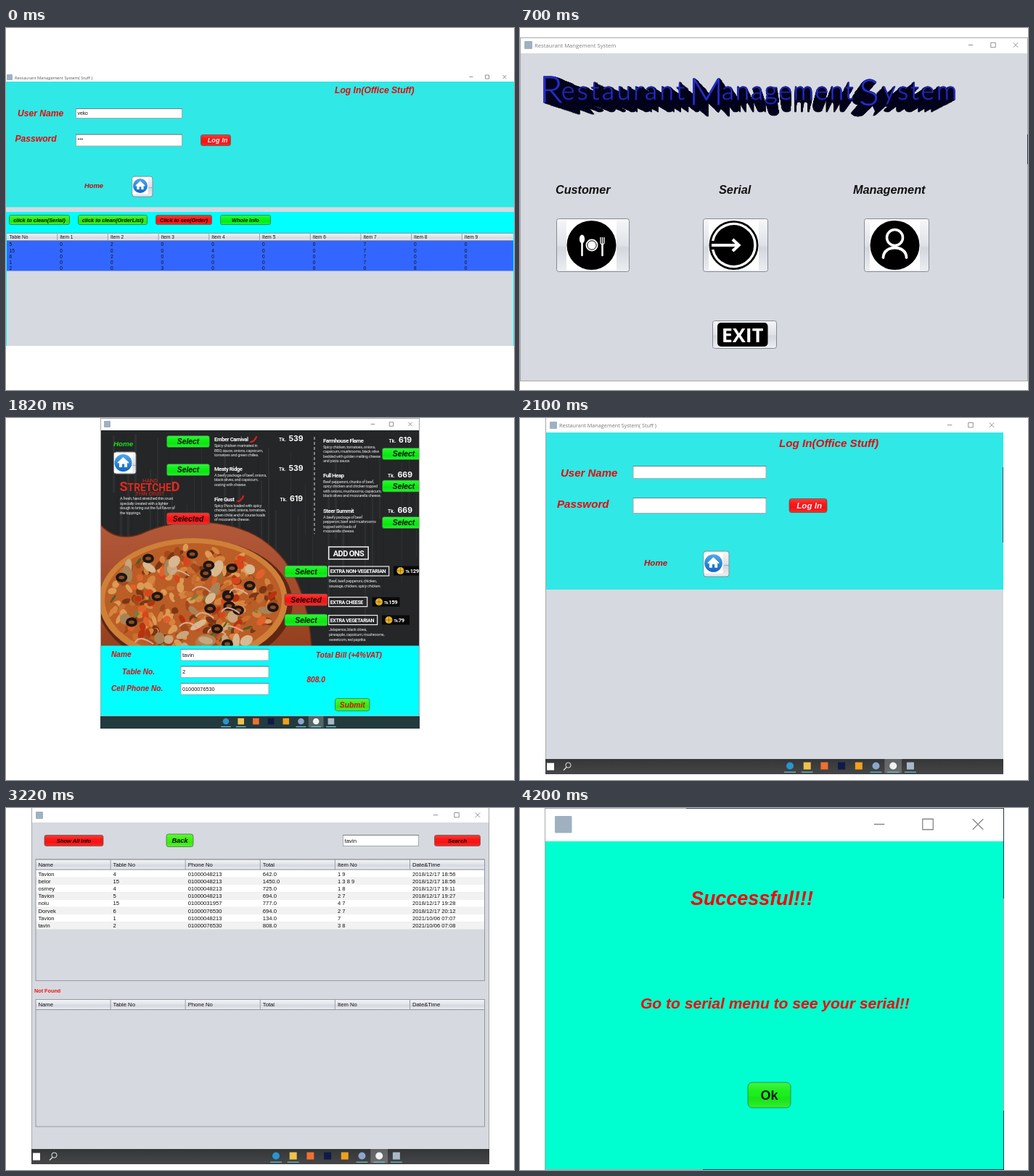
These frames come from a looping animation (700x500 px, 4.9 s). An HTML page:

```html
<!DOCTYPE html>
<html lang="en">
<head>
<meta charset="utf-8">
<title>Restaurant Management System</title>
<style>
  html, body { margin: 0; width: 100%; height: 100%; overflow: hidden; background: #fff; }
  svg { display: block; width: 100vw; height: 100vh; }
  text { font-family: "Liberation Sans", Arial, sans-serif; white-space: pre; }
  .bi { font-weight: 700; font-style: italic; }
  .b { font-weight: 700; }
  .it { font-style: italic; }
  .ui { font-family: "Open Sans", sans-serif; }
  .ro { font-family: Roboto, sans-serif; }
  .rb { font-family: Roboto, sans-serif; font-weight: 700; }
  .tight { letter-spacing: -.055em; }
  .num { font-family: Inter, sans-serif; font-weight: 700; }
  .serif { font-family: "Noto Serif", serif; font-weight: 700; }
  .lato { font-family: Lato, sans-serif; font-weight: 300; }
  .slide { visibility: hidden; animation: show 4900ms step-end infinite; }
  @keyframes show {
    0% { visibility: visible; }
    14.2857%, 100% { visibility: hidden; }
  }
</style>
</head>
<body>
<svg id="stage" viewBox="0 0 700 500"></svg>
<script>
const GREY = '#d6d9df', RED = '#ff1414', GREEN = '#2cf012', INK = '#e80808';
const CYAN = '#00ffff', TEAL = '#30e8e6';
const PHONE = ['01000048213', '01000076530', '01000031957'];

const rect = (x, y, w, h, fill, more = '') =>
  `<rect x="${x}" y="${y}" width="${w}" height="${h}" fill="${fill}" ${more}/>`;
const circle = (x, y, r, fill, more = '') =>
  `<circle cx="${x}" cy="${y}" r="${r}" fill="${fill}" ${more}/>`;
const ellipse = (x, y, rx, ry, fill, more = '') =>
  `<ellipse cx="${x}" cy="${y}" rx="${rx}" ry="${ry}" fill="${fill}" ${more}/>`;
const path = (d, stroke, width, fill = 'none', more = '') =>
  `<path d="${d}" stroke="${stroke}" stroke-width="${width}" fill="${fill}" ${more}/>`;
const text = (x, y, s, size, cls = '', fill = '#111', more = '') =>
  `<text x="${x}" y="${y}" font-size="${size}" class="${cls}" fill="${fill}" ${more}>${s}</text>`;
const lines = (x, y, s, step = 6.65) =>
  s.split('|').map((l, i) => text(x, y + i * step, l, 5.7, 'ro tight', '#e6e6e6')).join('');

const frame = (x, y, w, h) =>
  rect(x + .5, y + .5, w - 1, h - 1, 'none', 'stroke="#a8a8a8"');

function button(x, y, w, h, fill, label, size, color = '#0a0a0a', cls = 'bi') {
  return rect(x + .5, y + .5, w - 1, h - 1, fill, `rx="${h / 6}" stroke="#47604a" stroke-opacity=".7"`) +
    rect(x + 1, y + 1, w - 2, h - 2, 'url(#gloss)', `rx="${h / 7}"`) +
    text(x + w / 2, y + h / 2 + size * .34, label, size, cls, color, 'text-anchor="middle"');
}

const plainButton = (x, y, w, h) =>
  rect(x + .5, y + .5, w - 1, h - 1, 'url(#steel)', 'rx="3" stroke="#868b94"');

const field = (x, y, w, h, s = '', size = 7.6) =>
  rect(x + .5, y + .5, w - 1, h - 1, '#fff', 'stroke="#a4a9b0"') +
  path(`M${x} ${y + .5}h${w}`, '#777d86', 1) +
  text(x + 2.5, y + h / 2 + size * .36, s, size);

function controls(xs, y, s, color = '#777') {
  const [a, b, c] = xs, h = s / 2;
  return path(`M${a - h} ${y}h${s}M${b - h} ${y - h}h${s}v${s}h${-s}z` +
    `M${c - h} ${y - h}l${s} ${s}m0 ${-s}l${-s} ${s}`, color, Math.max(.8, s / 11));
}

const appIcon = (x, y, s) => rect(x, y, s, s, '#9fb1c1', 'rx="1"');

function home(x, y, s, cx, cy, r) {
  const k = r / 12;
  return plainButton(x, y, s, s) +
    rect(cx - r * 1.06, cy - r * 1.15, r * 2.12, r * 2.3, '#fff') +
    circle(cx, cy, r, 'url(#blue)') +
    `<path transform="translate(${cx} ${cy}) scale(${k})" fill="#fff"
      d="M0 -8L8 -.5L6.8 .8L5.5 -.3V6H1.7V1.5H-1.7V6H-5.5V-.3L-6.8 .8L-8 -.5z"/>` +
    text(x + s - 1, cy + r * .3, '...', r * .6, '', '#333', 'text-anchor="end"');
}

function header(x, y, w, h, names, step, size) {
  return rect(x, y, w, h, 'url(#steel)') +
    path(`M${x} ${y + .5}h${w}M${x} ${y + h - .5}h${w}`, '#8f949d', 1) +
    names.map((n, i) => text(x + step * i + 3.5, y + h / 2 + size * .36, n, size) +
      (i ? path(`M${x + step * i} ${y}v${h}`, '#9ca1aa', 1) : '')).join('');
}

const cells = (x, y, rows, step, pitch, size, cls = '') =>
  rows.map((row, j) => row.map((s, i) =>
    text(x + step * i, y + pitch * j, s, size, cls)).join('')).join('');

function taskIcons(x, step, y, s) {
  const fills = ['#2b94cf', '#efc34a', '#f07030', '#101a48', '#f0a01e', '#8ea5cc', '#f2f2f2', '#a9b8c6'];
  const h = s / 2;
  return fills.map((f, i) => {
    const cx = x + step * i, open = [0, 1, 5, 6, 7].includes(i);
    return (i === 6 ? rect(cx - step / 2, y - s, step, s * 2, '#fff', 'opacity=".22"') : '') +
      ([0, 5, 6].includes(i) ? circle(cx, y, h, f) : rect(cx - h, y - h, s, s, f)) +
      (open ? rect(cx - s * .8, y + s * .8, s * 1.6, 1.2, '#6fc3cc') : '');
  }).join('');
}

const desktopBar = () => rect(35, 471, 631, 21, 'url(#bar)') +
  rect(37, 476.5, 10, 10, '#fff') +
  circle(66.5, 479.5, 3.6, 'none', 'stroke="#eee"') + path('M64 482.5l-4 4', '#eee', 1.1) +
  taskIcons(372, 23.7, 480.5, 10);

function orders() {
  const items = ['5 0 2 0 0 0 0 7 0 0', '15 0 0 0 4 0 0 7 0 0', '6 0 2 0 0 0 0 7 0 0',
    '1 0 0 0 0 0 0 7 0 0', '2 0 0 3 0 0 0 0 8 0'].map(r => r.split(' '));
  const names = ['Table No', ...Array.from({ length: 9 }, (_, i) => 'Item ' + (i + 1))];
  return appIcon(1, 64, 8) + text(12, 70.5, 'Restaurant Management System( Stuff )', 5.8, 'ui', '#555') +
    controls([641, 663, 687], 67.5, 5) +
    rect(0, 74, 700, 174, TEAL) + rect(0, 247.5, 700, 6.5, GREY) + rect(0, 254, 700, 185, CYAN) +
    text(453, 90, 'Log In(Office Stuff)', 12.15, 'bi', INK) +
    text(16, 122, 'User Name', 12.1, 'bi', INK) + text(12.5, 157, 'Password', 12.1, 'bi', INK) +
    field(96, 111, 147, 14, 'veko', 6.8) + field(96, 146.5, 147, 17, '***', 6.8) +
    button(268, 147, 42, 16, RED, '  Log In', 9.3, '#d8f2f8') +
    text(108, 221, 'Home', 9.4, 'bi', '#c80808') + home(173.5, 204.5, 29, 185, 218, 10) +
    button(4, 258, 84, 14, GREEN, 'click to clean(Serial)', 7.4) +
    button(99, 258, 96, 14, GREEN, 'click to clean(OrderList)', 7.4) +
    button(206, 258, 78, 14, RED, 'Click to see(Order)', 7.4) +
    button(295, 258, 70, 14, '#04f71a', 'Whole Info', 7.4) +
    rect(1, 283, 698, 156, GREY) +
    header(1, 283, 698, 11, names, 69.7, 6.6) + rect(1, 294, 698, 41.5, '#3366ff') +
    cells(4.5, 301.3, items, 69.7, 8.2, 6.6);
}

// Headline with the slices of its depth shrinking towards one point
function headline() {
  const big = (x, y, s) => `<text x="${x}" y="${y}" font-size="52" class="lato">${s}</text>`;
  const small = (x, s, gap) =>
    `<text x="${x}" y="99" font-size="35" class="lato" letter-spacing="${gap}">${s}</text>`;
  let s = '<defs><g id="title" stroke-width=".8">' + big(27, 103, 'R') + small(57, 'estaurant', 3.6) +
    big(233, 106, 'M') + small(278, 'anagement', 1.9) + big(467, 107, 'S') + small(500, 'ystem', 2.9) + '</g></defs>';
  for (let i = 45; i > 0; i--) {
    const d = i * .0031;
    s += `<use href="#title" fill="#04041c" stroke="#04041c" transform="translate(${375 * d} ${218 * d}) scale(${1 - d})"/>`;
  }
  return s + '<use href="#title" fill="#2832d8" stroke="#1c22a8"/>';
}

function mainMenu() {
  const tile = (x, w, cx) => plainButton(x, 263, w, 74) + rect(cx - 34.5, 265, 69, 69.5, '#fff') +
    circle(cx, 300, 34, '#000');
  return rect(0, 35, 700, 453, GREY) + appIcon(6, 18, 11) +
    text(20, 26.7, 'Restaurant Mangement System', 7.7, 'ui', '#808080') + controls([621, 652, 683], 23.5, 6.5) +
    headline() +
    text(49, 229, 'Customer', 16.2, 'bi') + text(274, 229, 'Serial', 16.3, 'bi') +
    text(459, 229, 'Management', 16.3, 'bi') +
    tile(50, 101, 98.5) + tile(252, 90, 294.5) + tile(474, 90, 516.5) +
    ellipse(85.5, 291.5, 3.6, 6, '#fff') +
    path('M85.5 296V314', '#fff', 2.6, 'none', 'stroke-linecap="round"') +
    circle(99, 300, 8.5, '#fff') + circle(99, 300, 6.2, 'none', 'stroke="#000"') +
    path('M113.5 300V314', '#fff', 2.6, 'none', 'stroke-linecap="round"') +
    path('M111 289v8q2.5 5 5 0v-8M113.5 289v10', '#fff', 1.3) +
    path('M265.6 294A29.5 29.5 0 1 1 265.6 306', '#fff', 3.5) +
    path('M264 300H301M293 292l8.5 8l-8.5 8', '#fff', 4.2) +
    circle(516.5, 289.5, 11, 'none', 'stroke="#fff" stroke-width="3.5"') +
    path('M500.5 317C501 299 532 299 532.5 317', '#fff', 3.8, 'none', 'stroke-linecap="round"') +
    plainButton(265, 404, 89, 39) + rect(272, 407, 69.5, 33, '#000', 'rx="5"') +
    text(306.5, 433.5, 'EXIT', 27, 'ui b', '#fff', 'text-anchor="middle"') +
    frame(0, 13, 700, 475) + rect(699, 147, 1, 41, '#24344f');
}

function pizza() {
  let seed = 11;
  const rnd = () => (seed = seed * 16807 % 2147483647) / 2147483647;
  const cx = 258, cy = 252;
  let s = path('M130 147Q152 172 186 160C240 134 320 140 360 173Q414 214 421 316H130z', '#6b2d18', 1.5, 'url(#wood)') +
    ellipse(cx + 3, cy + 4, 134, 89, '#5f2612') +
    ellipse(cx, cy, 130, 86, '#cf8038') +
    ellipse(cx, cy - 1, 122, 78, '#bb5d26');
  const spot = () => {
    const a = rnd() * 6.283, r = Math.sqrt(rnd());
    return [cx + Math.cos(a) * r * 117, cy + Math.sin(a) * r * 74, rnd()];
  };
  const blob = (n, fills, w, h) => {
    for (let i = 0; i < n; i++) {
      const [x, y, k] = spot();
      s += ellipse(0, 0, w * (.6 + k * .6), h * (.6 + rnd() * .6), fills[i % fills.length],
        `transform="translate(${x} ${y}) rotate(${k * 360})"`);
    }
  };
  blob(260, ['#a34a1c', '#d5843e', '#b95c26', '#dc9a55', '#7c3514', '#c86f30'], 7, 4.5);
  blob(44, ['#d8451c', '#e0612a', '#b8320f'], 7, 4.5);
  blob(22, ['#4c5f22', '#71803a'], 6, 1.7);
  blob(24, ['#c9a57c', '#a98358', '#d8b890'], 11, 7);
  for (let i = 0; i < 26; i++) {
    const [x, y, k] = spot();
    if (i % 3) s += ellipse(x, y, 6, 4.5, '#8c4a22', 'stroke="#1c1613" stroke-width="4"');
    else s += path(`M${x - 12} ${y}q${12 * k} -12 25 2`, '#d6aa96', 2);
  }
  return s;
}

function board() {
  let s = rect(130, 17, 440, 298, '#252627');
  for (let i = 0; i < 60; i++) {
    const x = 131 + (i * 97) % 439;
    s += rect(x, 17 + (i * 53) % 130, 1 + i % 3, 70 + (i * 31) % 130, i % 2 ? '#fff' : '#000', 'opacity=".045"');
  }
  return s;
}

function order() {
  const dish = (x, y, name, body, px, price) => text(x, y, name, 7.7, 'rb tight', '#fff') +
    lines(x, y + 8, body) + text(px, y, 'Tk.', 6.3, 'num', '#fff') + text(px + 13.5, y, price, 10.5, 'num', '#fff');
  const chilli = (x, y) => path(`M${x} ${y}q5 0 8 -7`, '#d52318', 2.2, 'none', 'stroke-linecap="round"');
  const select = (x, y, on) => button(x, y, 60, 17, on ? RED : '#0cf014', on ? 'Selected' : 'Select', 10.3);
  const label = (y, w, s) => rect(444.7, y, w, 13, 'none', 'stroke="#eee" stroke-width="1.2"') +
    text(446.7, y + 9.2, s, 7.1, 'rb tight', '#fff');
  const tag = (x, y, price) => rect(x, y, 38, 13, '#090909') + circle(x + 9.5, y + 6.5, 5, '#e5b52b') +
    path(`M${x + 9.5} ${y + 2}v9M${x + 5} ${y + 6.5}h9`, '#8c6511', .7) +
    text(x + 16.5, y + 9.2, `Tk.<tspan font-size="7.6">${price}</tspan>`, 4.8, 'rb tight', '#fff');
  const label2 = (x, y, s) => text(x, y, s, 10.1, 'bi', '#e00c0c');
  const mid = 'text-anchor="middle"', crust = '#e02a1c';

  return `<g clip-path="url(#menu)">` + board() + pizza() +
    text(148, 39, 'Home', 9.8, 'bi', '#10e818') + home(148.5, 46.5, 31, 161.5, 62, 12) +
    text(198.5, 88.5, 'HAND', 7.6, 'ro', crust, mid) +
    text(198, 100.5, '<tspan font-size="18">S</tspan>TRETCHE<tspan font-size="18">D</tspan>', 13.8, 'rb', crust, mid) +
    text(198.5, 106.5, 'THIN CRUST', 7, 'ro', crust, mid) +
    lines(157, 113, 'A fresh, hand stretched thin crust|specially created with a lighter|dough to bring out the full flavor of|the toppings.') +
    dish(287, 32, 'Ember Carnival', 'Spicy chicken marinated in|BBQ sauce, onions, capsicum,|tomatoes and green chilies.', 376, '539') +
    dish(287, 72.5, 'Meaty Ridge', 'A beefy package of beef, onions,|black olives, and capsicum,|oozing with cheese.', 376, '539') +
    dish(287, 114.5, 'Fire Gust', 'Spicy Pizza loaded with spicy|chicken, beef, onions, tomatoes,|green chilis and of course loads|of mozzarella cheese.', 377.5, '619') +
    chilli(337, 33) + chilli(319, 115) +
    path('M425 26V160', '#ddd', 1, 'none', 'stroke-dasharray="4 3"') +
    dish(437, 33.5, 'Farmhouse Flame', 'Spicy chicken, tomatoes, onions,|capsicum, mushrooms, black olive|bedded with golden melting cheese|and pizza sauce.', 527.5, '619') +
    dish(437, 81.5, 'Full Heap', 'Beef pepperoni, chunks of beef,|spicy chicken and chicken topped|with onions, mushrooms, capsicum,|black olives and mozzarella cheese.', 526, '669') +
    dish(437, 130.5, 'Steer Summit', 'A beefy package of beef|pepperoni, beef and mushrooms|topped with loads of|mozzarella cheese.', 526, '669') +
    rect(444.7, 178, 54.5, 17, 'none', 'stroke="#eee" stroke-width="1.5"') +
    text(472, 190.6, 'ADD ONS', 11, 'rb tight', '#fff', mid) +
    label(205, 83, 'EXTRA NON-VEGETARIAN') + label(247.5, 53, 'EXTRA CHEESE') + label(272.5, 67, 'EXTRA VEGETARIAN') +
    tag(534, 204.5, '129') + tag(504.5, 247.5, '159') + tag(518, 272.5, '79') +
    lines(445, 227, 'Beef, beef pepperoni, chicken,|sausage, chicken, spicy chicken.', 7) +
    lines(445, 294, 'Jalapenos, black olives,|pineapple, capsicum, mushrooms,|sweetcorn, red paprika', 7.2) +
    select(221, 24) + select(221, 63) + select(221, 130.5, 1) + select(518, 41) + select(518, 85.5) +
    select(518, 136) + select(383.5, 203.5) + select(383.5, 242.5, 1) + select(383.5, 270.5) +
    rect(130, 314.5, 440, 97, CYAN) +
    label2(145, 330, 'Name') + label2(160, 353.5, 'Table No.') + label2(145, 377, 'Cell Phone No.') +
    field(240.5, 319, 122, 16.5, 'tavin') + field(240.5, 342.5, 122, 16.5, '2') + field(240.5, 366, 122, 16.5, PHONE[1], 7.3) +
    label2(427, 331, 'Total Bill (+4%VAT)') + label2(414.5, 365, '808.0') +
    button(453, 387, 48.5, 18, '#36f216', 'Submit', 10.3, '#e00c0c') + '</g>' +
    rect(130, 411, 440, 18, '#233b3e') + taskIcons(303, 20.7, 419, 8.6) +
    frame(130, 0, 440, 412) + appIcon(135, 4, 9) + controls([505.5, 531, 557], 8.5, 5.5);
}

function login() {
  return rect(35, 20, 631, 217, TEAL) + rect(35, 237, 631, 234, GREY) +
    appIcon(41, 5, 10) + text(54, 13, 'Restaurant Management System( Stuff )', 7.25, 'ui', '#777') +
    controls([592, 621, 650], 9.7, 6.5) +
    text(357, 40, 'Log In(Office Stuff)', 15.2, 'bi', INK) +
    text(56, 80.5, 'User Name', 15, 'bi', INK) + text(51, 124, 'Password', 15.15, 'bi', INK) +
    field(155.5, 66, 184, 18) + field(155.5, 110, 184, 22) +
    button(370.5, 111, 53, 20, RED, ' Log In', 11.6, '#d8f2f8') +
    text(171, 204, 'Home', 11.6, 'bi', '#d00808') + home(252.5, 183.5, 36, 266.5, 200.5, 12.3) +
    rect(665, 68, 1, 104, '#285a70') + path('M35.5 0V471', '#a8a8a8', 1) + desktopBar();
}

function records() {
  const names = ['Name', 'Table No', 'Phone No', 'Total', 'Item No', 'Date&amp;Time'];
  const [a, b, c] = PHONE;
  const rows = [
    ['Tavion', 4, a, '642.0', '1 9', '2018/12/17 18:56'],
    ['belor', 15, a, '1450.0', '1 3 8 9', '2018/12/17 18:56'],
    ['osmey', 4, a, '725.0', '1 8', '2018/12/17 19:11'],
    ['Tavion', 5, a, '694.0', '2 7', '2018/12/17 19:27'],
    ['nolu', 15, c, '777.0', '4 7', '2018/12/17 19:28'],
    ['Dorvek', 6, b, '694.0', '2 7', '2018/12/17 20:12'],
    ['Tavion', 1, a, '134.0', '7', '2021/10/06 07:07'],
    ['tavin', 2, b, '808.0', '3 8', '2021/10/06 07:08']
  ];
  const grid = (y, h, head) => header(41, y, 619, head, names, 103.1, 7.7) +
    rect(41, y + .5, 618.5, h - 1, 'none', 'stroke="#9499a2"');
  return rect(35, 20, 631, 451, GREY) + appIcon(41, 5, 10) + controls([592, 621, 650], 9.7, 6.5) +
    button(52.5, 37, 82, 16, RED, 'Show All Info', 7.5) + button(220.5, 35.5, 38, 18.5, '#40f410', 'Back', 9.3) +
    field(464, 37, 105, 16, 'tavin', 7.8) + button(590, 37, 64, 16, RED, 'Search', 7.8) +
    rows.map((_, i) => rect(41, 85.5 + i * 10.25, 619, 10.25, i % 2 ? '#f2f2f2' : '#fff')).join('') +
    grid(70.5, 168.5, 15) + cells(44.5, 93.5, rows, 103.1, 10.23, 7.65) +
    text(39, 254.8, 'Not Found', 7.25, 'b', '#f01010') + grid(264, 176.5, 15) +
    path('M35.5 0V471M665.5 0V471', '#a8a8a8', 1) + desktopBar();
}

function serials() {
  const names = ['Name', 'Sl No', 'Date', 'Time', 'Table No'];
  const rows = [
    ['Tavion', 1, '2018/12/17', '19:27', 5], ['nolu', 2, '2018/12/17', '19:28', 15],
    ['Dorvek', 3, '2018/12/17', '20:12', 6], ['Tavion', 4, '2021/10/06', '07:07', 1],
    ['tavin', 5, '2021/10/06', '07:08', 2]
  ];
  return rect(0, 61, 700, 403, GREY) + appIcon(7, 43, 12) + controls([612, 647, 682], 48.5, 8) +
    text(31, 96, 'Home', 17.8, 'bi', '#d00404') + home(106.5, 70.5, 43, 123.5, 91.5, 14.5) +
    button(295, 79, 84.5, 26, RED, 'Click to see', 9.5, '#1a0000', 'it') +
    rect(7, 138, 686, 62, '#00ccff') + header(7, 121.5, 686, 17, names, 137.1, 9.6) +
    cells(11.5, 149, rows, 137.1, 12.2, 9.7, 'serif') +
    rect(7.5, 122, 685, 322.5, 'none', 'stroke="#8f949d"') +
    frame(0, 37, 700, 427) + rect(699, 147, 1, 96, '#4a5f8c') + rect(699, 338, 1, 41, '#2c4f96');
}

function success() {
  return rect(35, 46, 631, 453, '#00ffd0') + appIcon(48, 11, 23.5) + controls([495, 562, 631], 22.5, 14.5, '#888') +
    text(235, 134, 'Successful!!!', 26.9, 'bi', '#f00808') +
    text(166, 276.5, 'Go to serial menu to see your serial!!', 21.05, 'bi', '#f00808') +
    button(313.5, 378.5, 60, 36, '#1af01a', 'Ok', 18, '#0a200a', 'b') +
    frame(34, 0, 633, 500) + rect(229, 0, 437, 1, '#39475c') + rect(252, 499, 414, 1, '#39475c') +
    rect(666, 0, 1, 125, '#24344f') + rect(666, 418, 1, 82, '#24344f');
}

const stops = list => list.map(([o, c, a = 1]) =>
  `<stop offset="${o}" stop-color="${c}" stop-opacity="${a}"/>`).join('');
const gradient = (id, list) =>
  `<linearGradient id="${id}" x2="0" y2="1">${stops(list)}</linearGradient>`;

const defs = '<defs>' +
  gradient('gloss', [[0, '#fff', .16], [.4, '#fff', 0], [.6, '#000', .05], [1, '#fff', .1]]) +
  gradient('steel', [[0, '#f6f7f9'], [.5, '#dfe2e8'], [.55, '#d3d7de'], [1, '#eceef2']]) +
  gradient('blue', [[0, '#4fa8ee'], [1, '#0f66c2']]) +
  gradient('bar', [[0, '#343638'], [1, '#444648']]) +
  gradient('wood', [[0, '#b3593a'], [1, '#94401f']]) +
  '<clipPath id="menu"><rect x="130.5" y="17" width="439.5" height="395"/></clipPath></defs>';

const slides = [orders, mainMenu, order, login, records, serials, success];
document.getElementById('stage').innerHTML = defs + slides.map((draw, i) =>
  `<g class="slide" style="animation-delay:${i * 700 - (i ? 4900 : 0)}ms">${draw()}</g>`).join('');
</script>
</body>
</html>
```
